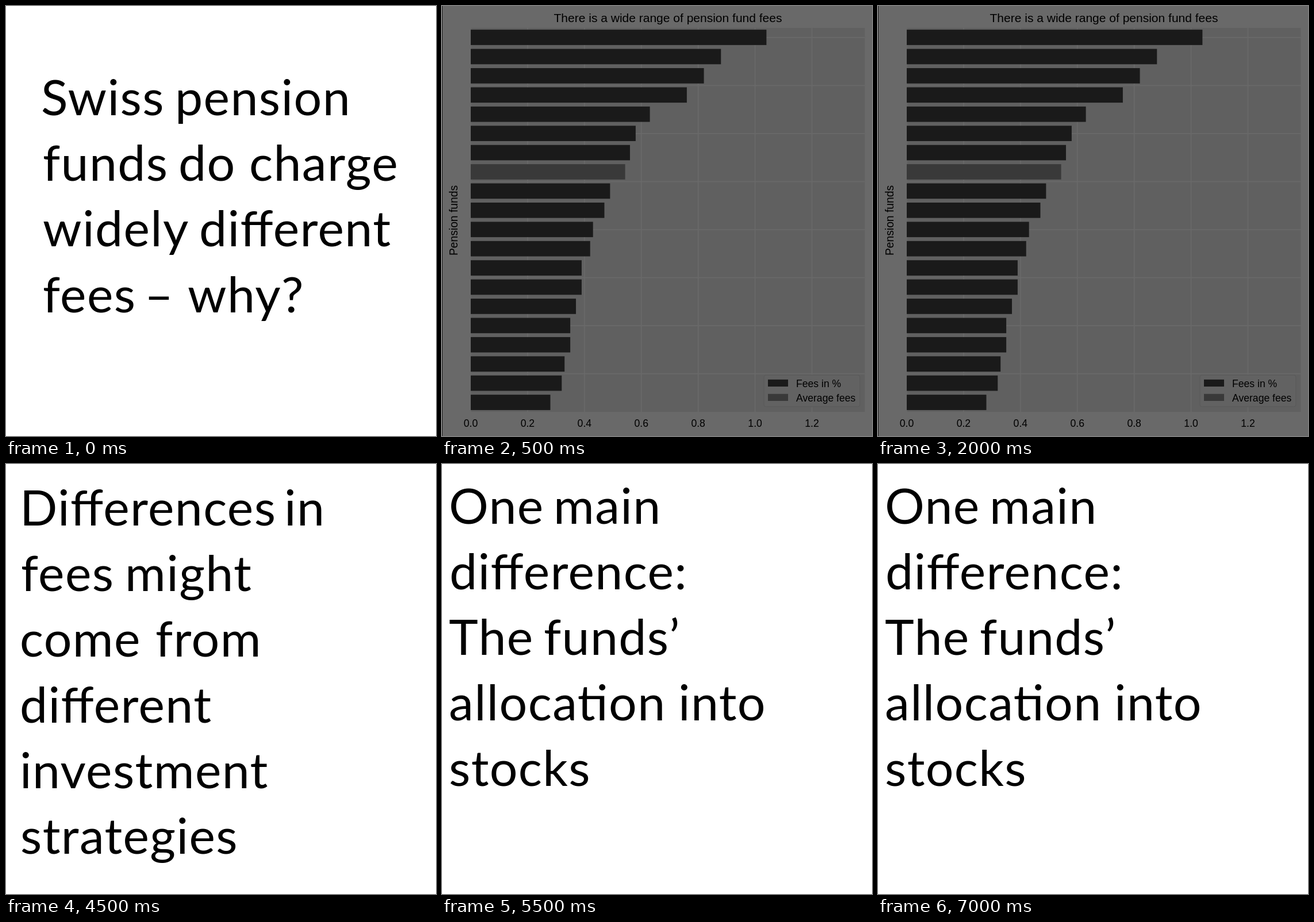
Write an HTML page that moves like this. It is 748 px wide and 748 px high and loops after 8000 ms.

```html
<!DOCTYPE html>
<html lang="en">
<head>
<meta charset="utf-8">
<title>Pension fund fees</title>
<style>
html, body { margin: 0; width: 100%; height: 100%; overflow: hidden; background: #fff; }
svg { display: block; width: 100vw; height: 100vh; }
.slide text { font: 86px Lato, sans-serif; letter-spacing: 1.4px; font-feature-settings: "liga" 1; }
.chart text { font: 17.6px "Liberation Sans", Arial, sans-serif; }
</style>
</head>
<body>
<svg id="stage" viewBox="0 0 748 748" xmlns="http://www.w3.org/2000/svg"></svg>
<script>
const NS = "http://www.w3.org/2000/svg";
const stage = document.getElementById("stage");

function add(parent, tag, attrs, text) {
  const el = document.createElementNS(NS, tag);
  for (const k in attrs) el.setAttribute(k, attrs[k]);
  if (text) el.textContent = text;
  parent.appendChild(el);
  return el;
}

function rect(parent, x, y, width, height, fill) {
  return add(parent, "rect", { x, y, width, height, fill });
}

// Each line lists its words with their left edges.
function slide(firstLine, lines) {
  const g = add(stage, "g", { class: "slide" });
  rect(g, 0, 0, 748, 748, "#fff");
  lines.forEach((words, i) => {
    for (const [x, word] of words) add(g, "text", { x, y: firstLine + i * 114.2 }, word);
  });
  return g;
}

function chart() {
  const paper = "#696969", plot = "#606060", bar = "#1a1a1a", mean = "#393939";
  const left = 50, top = 38, right = 735.5, bottom = 706, unit = 494.6;
  const fees = [1.04, .88, .82, .76, .63, .58, .56, .543, .49, .47,
                .43, .42, .39, .39, .37, .35, .35, .33, .32, .28];
  const meanRow = 7, pitch = 33.42, thick = 26.7;

  const g = add(stage, "g", { class: "chart" });
  rect(g, 0, 0, 748, 748, paper);
  rect(g, 0, 0, 1, 748, "#1c1c1c");
  rect(g, left, top, right - left, bottom - top, plot);

  for (let i = 0; i < 7; i++) {
    const x = left + i * unit / 5;
    rect(g, x - 0.9, top, 1.8, bottom - top, paper);
    add(g, "text", { x, y: 732, "text-anchor": "middle" }, (i / 5).toFixed(1));
  }
  for (let i = 0; i < 8; i++) rect(g, left, 53.9 + i * pitch * 2.5, right - left, 1.8, paper);

  fees.forEach((fee, i) => {
    rect(g, left, 41.2 + i * pitch, fee * unit, thick, i === meanRow ? mean : bar);
  });

  const box = rect(g, 560, 642, 167, 55, "#626262");
  box.setAttribute("rx", 3.5);
  box.setAttribute("stroke", "#595959");
  [["Fees in %", bar], ["Average fees", mean]].forEach(([label, fill], i) => {
    rect(g, 567, 649.8 + i * 25, 35, 12.2, fill);
    add(g, "text", { x: 616, y: 662.5 + i * 25 }, label);
  });

  add(g, "text", { x: 393, y: 28, "text-anchor": "middle", style: "font-size:21px" },
    "There is a wide range of pension fund fees");
  add(g, "text", { transform: "translate(26.5 373) rotate(-90)", "text-anchor": "middle", style: "font-size:19.3px" },
    "Pension funds");
  return g;
}

const scenes = [
  { start: 0, view: slide(190, [
    [[61, "Swiss"], [294, "pension"]],
    [[64, "funds"], [300, "do"], [423, "charge"]],
    [[64, "widely"], [336, "different"]],
    [[64, "fees"], [241, "–"], [316, "why?"]]]) },
  { start: 500, view: chart() },
  { start: 3000, view: slide(107, [
    [[24, "Differences"], [484, "in"]],
    [[26, "fees"], [207, "might"]],
    [[24, "come"], [260, "from"]],
    [[24, "different"]],
    [[24, "investment"]],
    [[25, "strategies"]]]) },
  { start: 5500, view: slide(103.5, [
    [[12, "One"], [194, "main"]],
    [[13, "difference:"]],
    [[12, "The"], [177, "funds’"]],
    [[12, "allocation"], [411, "into"]],
    [[12, "stocks"]]]) }
];
const LOOP = 8000;

function draw(t) {
  const now = scenes.filter(s => s.start <= t).pop();
  for (const s of scenes) s.view.style.display = s === now ? "" : "none";
}

const begin = performance.now();
function tick() {
  draw((performance.now() - begin) % LOOP);
  requestAnimationFrame(tick);
}
draw(0);
requestAnimationFrame(tick);
</script>
</body>
</html>
```
